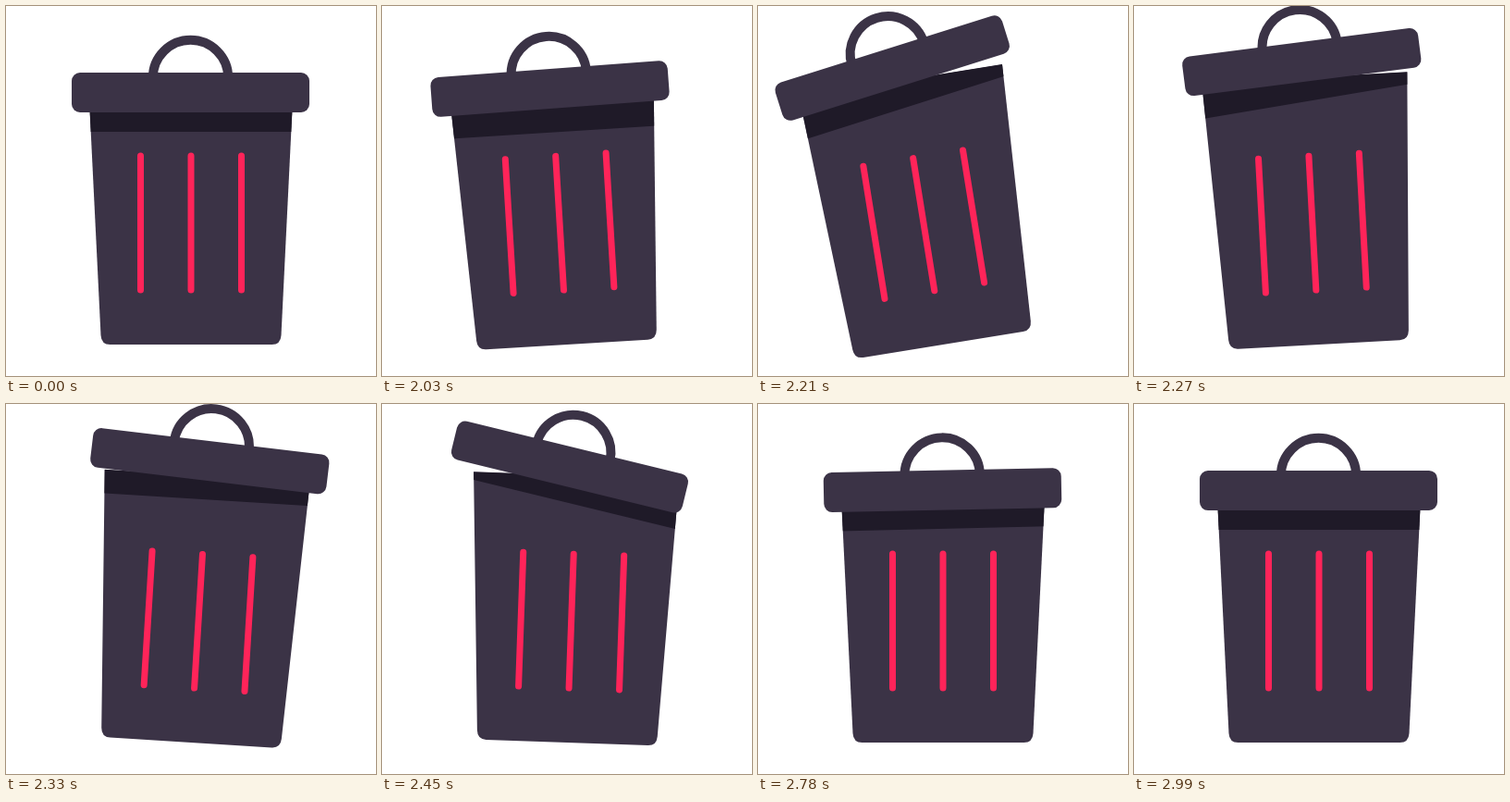
Recreate the animation shown at these times as an HTML page. Size 400 by 400 pixels, loop 3020 ms.

```html
<!DOCTYPE html>
<html lang="en">
<head>
<meta charset="utf-8">
<title>Trash can</title>
<style>
  html, body { margin: 0; width: 100%; height: 100%; overflow: hidden; background: #fff; }
  svg { display: block; width: 100%; height: 100%; }
</style>
</head>
<body>
<svg viewBox="0 0 400 400">
  <defs>
    <path id="shape" d="M88.8 77H311.2L297.5 356Q296.9 366 287.5 366H112.5Q103.1 366 102.5 356Z"/>
    <clipPath id="inside"><use href="#shape"/></clipPath>
  </defs>
  <g id="can">
    <use href="#shape" fill="#3b3346"/>
    <g clip-path="url(#inside)">
      <rect id="shadow" x="40" y="16" width="320" height="120" fill="#1f1a28"/>
    </g>
    <path d="M145.5 162V307M200 162V307M254.5 162V307" stroke="#ff2459" stroke-width="7" stroke-linecap="round"/>
    <g id="lid">
      <path d="M158.8 86V77.5a40.7 40.7 0 0 1 81.4 0V86" fill="none" stroke="#3b3346" stroke-width="10"/>
      <rect x="71" y="72" width="257" height="43" rx="9" fill="#3b3346"/>
    </g>
  </g>
</svg>
<script>
const LOOP = 3020, START = 2030, STEP = 30;
const SHADOW_LAG = 25;

const smooth = u => (1 - Math.cos(Math.PI * u)) / 2;
const sineOut = u => Math.sin(Math.PI * u / 2);
const cubicOut = u => 1 - (1 - u) ** 3;

// Starts at 0 and eases through legs of { to, by, ease }.
function motion(start, ...legs) {
  return t => {
    let from = 0, begun = start;
    for (const { to, by, ease = smooth } of legs) {
      if (t < by) return from + (to - from) * ease(Math.max(0, (t - begun) / (by - begun)));
      from = to;
      begun = by;
    }
    return from;
  };
}

const canTurn = motion(2000,
  { to: -9.2, by: 2205, ease: cubicOut }, { to: 3.7, by: 2340 }, { to: 0, by: 2575 });
const lidTurn = motion(1990,
  { to: -8.5, by: 2195 }, { to: 11.8, by: 2440 }, { to: -3.1, by: 2600 }, { to: 0, by: 3010, ease: sineOut });
const lidX = motion(1960,
  { to: -6.3, by: 2200 }, { to: 2.1, by: 2330 }, { to: -7.1, by: 2450 }, { to: 0, by: 2780 });
const lidY = motion(2007,
  { to: -33.5, by: 2270, ease: sineOut }, { to: 0, by: 2820 });

const [can, lid, shadow] = ["can", "lid", "shadow"].map(id => document.getElementById(id));

function place(part, x, y, angle, pivot) {
  part.setAttribute("transform", `translate(${x} ${y}) rotate(${angle} ${pivot})`);
}

function draw(time) {
  const t = time < START ? 0 : START + Math.floor((time - START) / STEP) * STEP;
  const late = t - SHADOW_LAG;
  place(can, 0, 0, canTurn(t), "200 365");
  place(lid, lidX(t), lidY(t), lidTurn(t), "199.5 93.5");
  place(shadow, 0, lidY(late), lidTurn(late), "200 136");
}

const begin = performance.now();
function tick() {
  draw((performance.now() - begin) % LOOP);
  requestAnimationFrame(tick);
}
tick();
</script>
</body>
</html>
```
